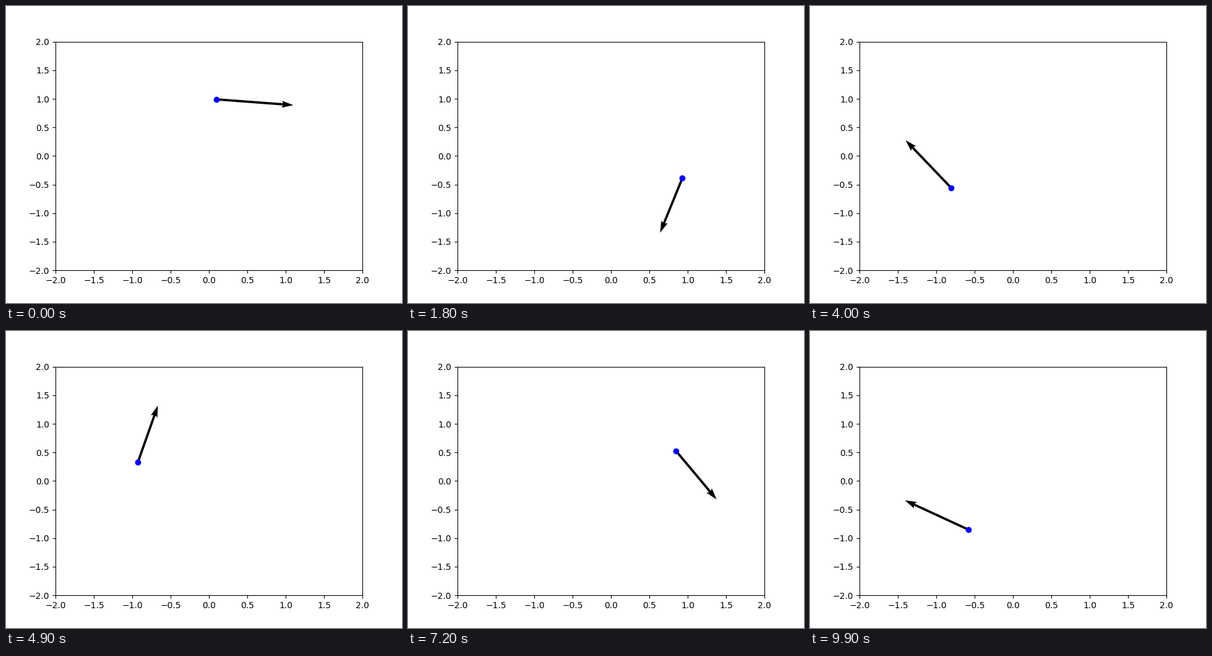
These frames come from a looping animation (640x480 px, 10 s). A matplotlib script:

```python
import numpy as np
import matplotlib.pyplot as plt
from matplotlib.animation import FuncAnimation

FRAMES = 100
INTERVAL = 100  # ms
DT = 0.1


def orbit(steps, dt):
    """Motion under a unit pull towards the centre (semi-implicit Euler)."""
    pos, vel = np.array([0.0, 1.0]), np.array([1.0, 0.0])
    states = []
    for _ in range(steps):
        vel = vel - pos / np.hypot(*pos) * dt
        pos = pos + vel * dt
        states.append((pos, vel))
    return states


states = orbit(FRAMES, DT)

fig, ax = plt.subplots(figsize=(6.4, 4.8), dpi=100)
ax.set_xlim(-2, 2)
ax.set_ylim(-2, 2)

(x, y), (u, v) = states[0]
dot, = ax.plot([x], [y], "bo")
arrow = ax.quiver([x], [y], [u], [v], angles="xy", scale_units="xy", scale=1)


def update(i):
    pos, vel = states[i]
    dot.set_data([pos[0]], [pos[1]])
    arrow.set_offsets([pos])
    arrow.set_UVC([vel[0]], [vel[1]])
    return dot, arrow


anim = FuncAnimation(fig, update, frames=FRAMES, interval=INTERVAL,
                     init_func=lambda: update(0), repeat=True, repeat_delay=0)
plt.show()
```
